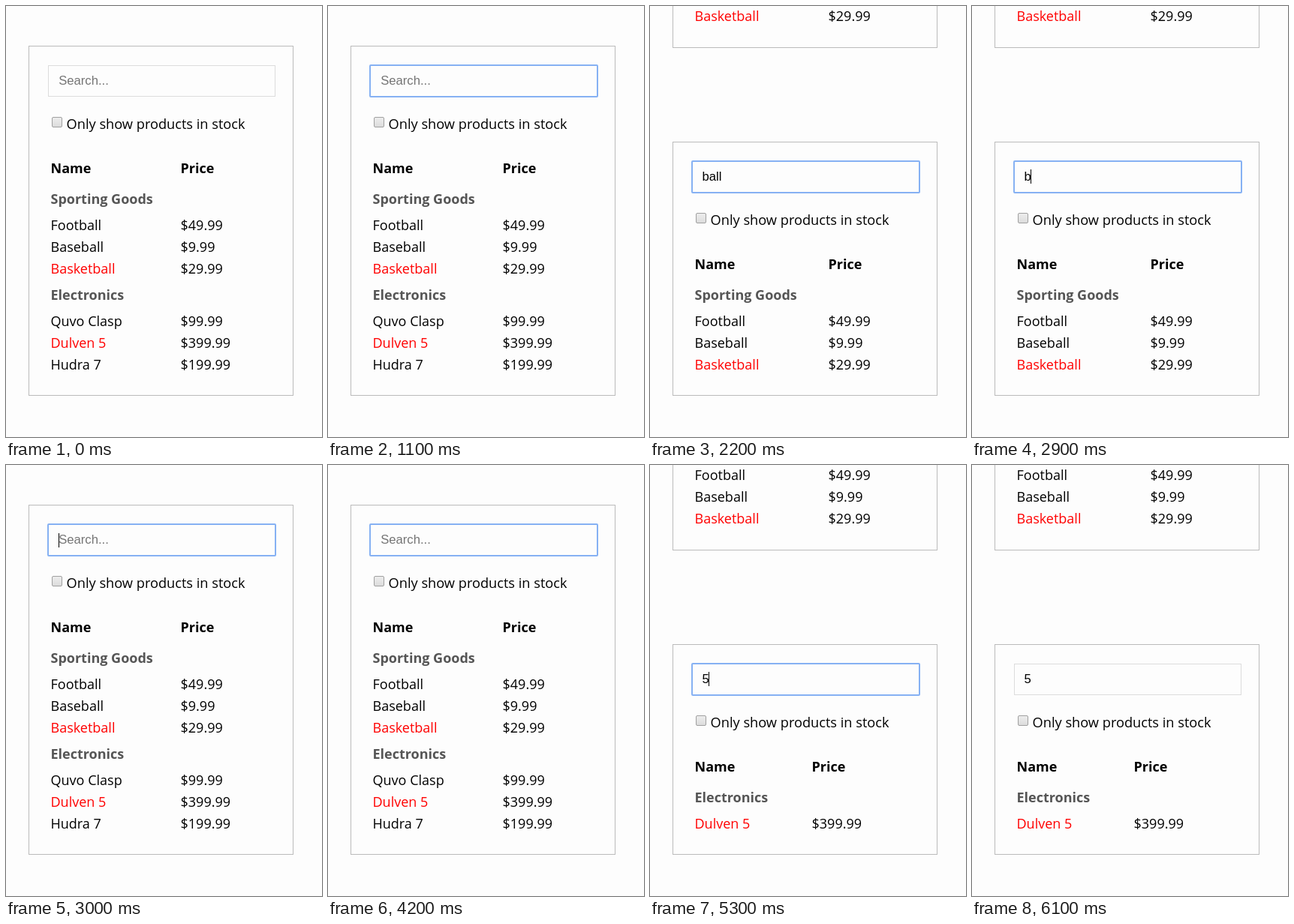
An HTML page for the animation above (6200 ms loop, 421 by 575 pixels).

```html
<!DOCTYPE html>
<html lang="en">
<head>
<meta charset="utf-8">
<title>Product search</title>
<style>
  html, body { margin: 0; width: 100%; height: 100%; overflow: hidden; background: #fdfdfd; }
  #stage { position: relative; width: 421px; height: 575px; overflow: hidden; }
  #stage div { position: absolute; box-sizing: border-box; white-space: pre; }
  .card { left: 30px; width: 353px; border: 1px solid #bbb; }
  .inner { left: -31px; top: -1px; }
  .text { font: 18px/28px "Open Sans", "Noto Sans", sans-serif; color: #000; }
  .option { font-size: 18.2px; }
  .head, .group { font-weight: 700; }
  .group { color: #555; }
  .out { color: #f00; }
  .input { left: 56px; top: 26px; width: 303px; height: 42px; border: 1px solid #dcdcdc; }
  .input.focus { left: 55px; top: 25px; width: 305px; height: 44px; border: 2px solid #86b1f3; border-radius: 2px; }
  .typed { left: 69.6px; top: 37px; font: 16.67px/19px "Liberation Sans", Arial, sans-serif; color: #000; }
  .hint { left: 70.2px; color: #757575; }
  .caret { width: 1px; height: 19px; background: #000; }
  .check { left: 61px; top: 95px; width: 14px; height: 14px; border: 1px solid #a0a0a0; border-radius: 2px;
           background: linear-gradient(#ededed, #dcdcdc); }
</style>
</head>
<body>
<div id="stage"></div>
<script>
const LOOP = 6200;
const BOTTOM = 520;
const GAP = 125;

const groups = [
  { name: "Sporting Goods", items: [
    { name: "Football", price: "$49.99", stocked: true },
    { name: "Baseball", price: "$9.99", stocked: true },
    { name: "Basketball", price: "$29.99", stocked: false } ] },
  { name: "Electronics", items: [
    { name: "Quvo Clasp", price: "$99.99", stocked: true },
    { name: "Dulven 5", price: "$399.99", stocked: false },
    { name: "Hudra 7", price: "$199.99", stocked: true } ] }
];

// start time, query, focused, caret visible
const steps = [
  [0, "", false, false],
  [600, "", true, true],
  [1100, "", true, false],
  [1400, "ba", true, true],
  [1600, "bal", true, true],
  [1800, "ball", true, true],
  [2200, "ball", true, false],
  [2600, "bal", true, true],
  [2700, "ba", true, true],
  [2900, "b", true, true],
  [3000, "", true, true],
  [3200, "", true, false],
  [3700, "", true, true],
  [4200, "", true, false],
  [4300, "5", true, true],
  [4800, "5", true, false],
  [5300, "5", true, true],
  [5800, "5", true, false],
  [6100, "5", false, false]
];

const caretX = { "": 70, b: 78, ba: 88, bal: 91, ball: 95, 5: 78 };
const priceX = query => query === "" ? 232.5 : query === "5" ? 215.5 : 237.5;

const box = (cls, style = "", text = "") => `<div class="${cls}" style="${style}">${text}</div>`;

const label = (x, baseline, text, cls = "") =>
  box("text " + cls, `left:${x}px;top:${baseline - 21}px`, text);

// Builds the table; returns its markup and the last baseline.
function table(query) {
  const px = priceX(query);
  let y = 170;
  let html = label(59.5, y, "Name", "head") + label(px, y, "Price", "head");
  y += 6;
  for (const group of groups) {
    const found = group.items.filter(p => p.name.toLowerCase().includes(query));
    if (!found.length) continue;
    y += 35;
    html += label(59.5, y, group.name, "group");
    y += 6;
    for (const p of found) {
      y += 29;
      html += label(59.5, y, p.name, p.stocked ? "" : "out") + label(px, y, p.price);
    }
  }
  return { html, end: y };
}

function field(query, focused, caret) {
  const caretTop = query ? 37 : 38;
  return box(focused ? "input focus" : "input") +
    box(query ? "typed" : "typed hint", "", query || "Search...") +
    (caret ? box("caret", `left:${caretX[query]}px;top:${caretTop}px`) : "");
}

function card(bottom, query, focused, caret, extra = 0) {
  const { html, end } = table(query);
  const height = end + 35 + extra;
  const top = bottom - height;
  const inner = field(query, focused, caret) + box("check") +
    label(80.6, 111, "Only show products in stock", "option") + html;
  return { top, html: box("card", `top:${top}px;height:${height}px`, box("inner", "", inner)) };
}

const stage = document.getElementById("stage");
let shown = null;

function draw(time) {
  const t = time % LOOP;
  const step = steps.filter(s => s[0] <= t).pop();
  if (step !== shown) {
    shown = step;
    const [, query, focused, caret] = step;
    const main = card(BOTTOM, query, focused, caret);
    const above = card(main.top - GAP, "ba", false, false, 1);
    stage.innerHTML = above.html + main.html;
  }
}

const start = performance.now();
function tick() {
  draw(performance.now() - start);
  requestAnimationFrame(tick);
}
tick();
</script>
</body>
</html>
```
